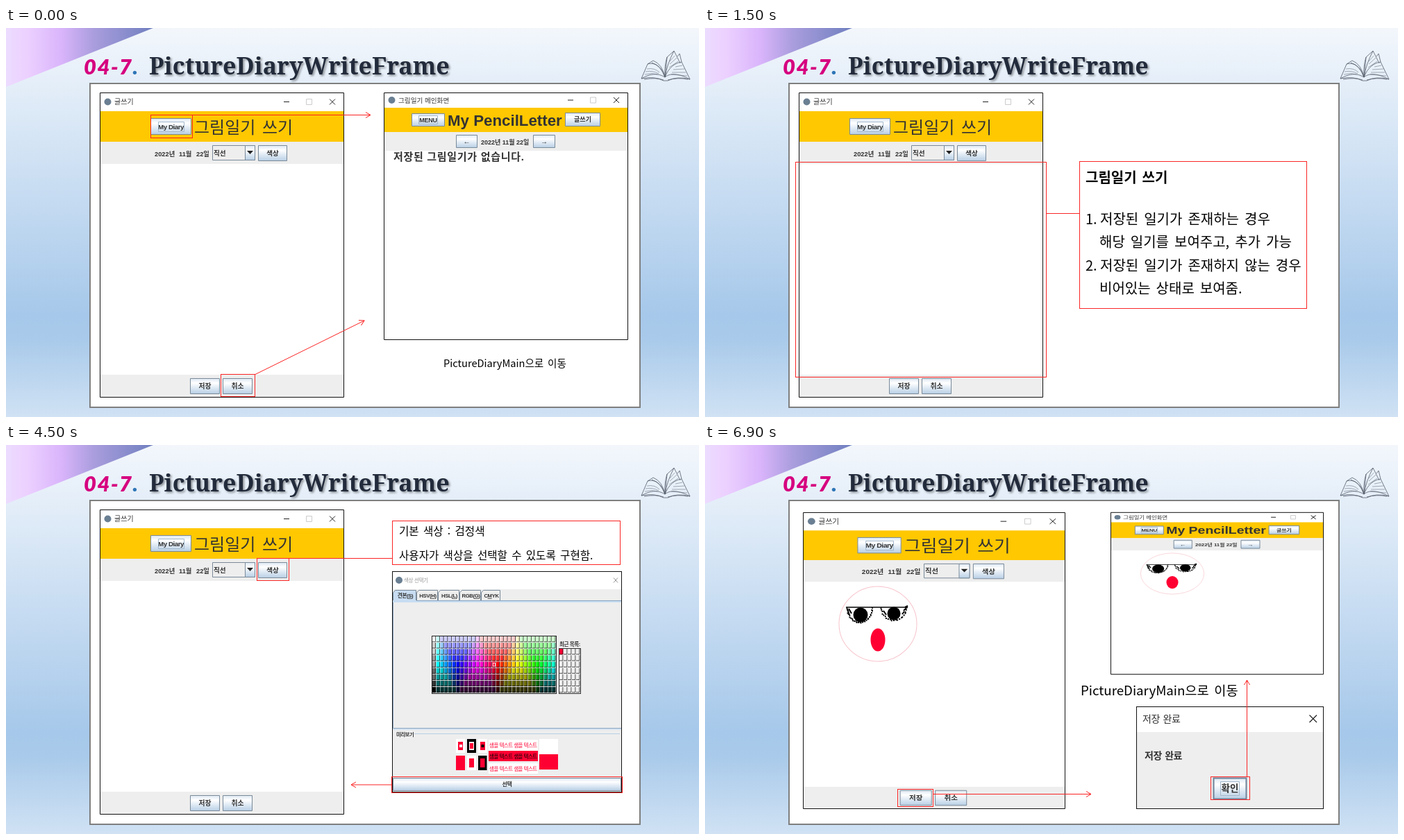
Recreate the animation shown at these times as an HTML page. Size 998 by 561 pixels, loop 7500 ms.

```html
<!DOCTYPE html>
<html lang="ko">
<head>
<meta charset="utf-8">
<title>Slides</title>
<style>
html, body { margin: 0; width: 100%; height: 100%; overflow: hidden; }
svg { display: block; width: 998px; height: 561px; }
text { white-space: pre; }
.ui { font-family: "Liberation Sans", "Noto Sans CJK KR", sans-serif; fill: #333; }
.slide { font-family: "Noto Sans CJK KR", sans-serif; word-spacing: .12em; fill: #000; }
.b { font-weight: 700; }
.mid { text-anchor: middle; }
.u { text-decoration: underline; }
.red { fill: none; stroke: #fb2424; stroke-width: 1; }
.edge { vector-effect: non-scaling-stroke; }
.title { font: 700 34.1px "Noto Serif", serif; fill: #222b3b; filter: drop-shadow(2px 2px 1.5px #0006); }
.num { font: italic 900 31px Lato, sans-serif; letter-spacing: 1.5px; fill: #d6007f; }
.scene { visibility: hidden; animation: show 7.5s step-end infinite; }
@keyframes show { 0% { visibility: visible; } 20%, 100% { visibility: hidden; } }
</style>
</head>
<body>
<svg id="stage" viewBox="0 0 998 561">
  <defs>
    <linearGradient id="sky" x2="0" y2="1">
      <stop offset="0" stop-color="#f3f7fc"/><stop offset=".74" stop-color="#a6c8ea"/>
      <stop offset=".8" stop-color="#a9caea"/><stop offset="1" stop-color="#d0e2f4"/>
    </linearGradient>
    <linearGradient id="corner">
      <stop offset="0" stop-color="#ecdcff"/><stop offset=".15" stop-color="#ecd0ff"/>
      <stop offset=".38" stop-color="#d9b4fb"/><stop offset=".6" stop-color="#a99ddd"/>
      <stop offset="1" stop-color="#7080c0"/>
    </linearGradient>
    <linearGradient id="metal" x2="0" y2="1">
      <stop offset="0" stop-color="#dde8f3"/><stop offset=".3" stop-color="#fff"/>
      <stop offset=".5" stop-color="#eaf1f8"/><stop offset="1" stop-color="#b8cfe5"/>
    </linearGradient>
  </defs>
  <rect width="998" height="561" fill="url(#sky)"/>
  <path d="M0 0H212L0 85Z" fill="url(#corner)"/>
  <text class="num" x="112" y="67">04-7<tspan fill="#2e75b6">.</tspan></text>
  <text class="title" x="206" y="67">PictureDiaryWriteFrame</text>
  <g fill="none" stroke="#555e6b" stroke-width=".8" stroke-linejoin="round">
    <path d="M949 71C938 64 927 66 915 73L924 52C934 49 944 55 949 71C957 64 970 66 985 74L973 49C964 50 954 57 949 71"/>
    <path d="M915 73Q934 69 947 76H953Q966 69 985 74M919 74Q936 71 947 75M953 75Q968 71 982 74"/>
    <path d="M924 52L932 47Q945 52 949 71L952 42L962 33L971 51M952 42Q948 54 949 71M962 33Q952 52 949 71M967 41L970 37L973 49M930 50Q943 54 949 71"/>
    <path d="M923 59Q934 57 941 64M921 63Q932 61 940 66M920 67Q930 64 938 67M964 56L974 54M961 60L977 59M959 64L979 64M958 67L981 69M956 48L963 40M956 52L966 43M955 57L968 48" stroke-width=".5"/>
  </g>
  <rect x="121" y="80" width="792" height="467" fill="#fff" stroke="#7f7f7f" stroke-width="2"/>
</svg>
<script>
const stage = document.getElementById('stage');

const rect = (x, y, x2, y2, fill, more = '') =>
  `<rect x="${x}" y="${y}" width="${x2 - x}" height="${y2 - y}" fill="${fill}" ${more}/>`;
const path = (d, more = '') => `<path d="${d}" fill="none" ${more}/>`;
const text = (cls, x, y, size, s, more = '') =>
  `<text class="${cls}" x="${x}" y="${y}" font-size="${size}" ${more}>${s}</text>`;
const bold = (x, y, size, s, more) => text('ui b', x, y, size, s, more);
const slide = (x, y, size, s, more) => text('slide', x, y, size, s, more);
const outline = 'class="edge" stroke="#7a8a99"';

const redBox = (x, y, x2, y2, fill = 'none') =>
  rect(x + .5, y + .5, x2 - .5, y2 - .5, fill, `class="red" style="fill:${fill}"`);
const redLine = d => path(d, 'class="red"');
const arrow = (x1, y1, x2, y2) => {
  const turn = Math.atan2(y2 - y1, x2 - x1) * 180 / Math.PI;
  return redLine(`M${x1} ${y1}L${x2} ${y2}`) +
    `<path class="red" d="M-7 -4L0 0L-7 4" transform="translate(${x2} ${y2}) rotate(${turn})"/>`;
};

const button = (x, y, x2, y2, label, size = 9.8, more = '') =>
  rect(x + .5, y + .5, x2 - .5, y2 - .5, 'url(#metal)', outline) +
  text('ui b mid', (x + x2) / 2, (y + y2) / 2 + size * .37, size, label, more);
const focus = (x, y, x2, y2) => rect(x + .5, y + .5, x2 - .5, y2 - .5, 'none', 'class="edge" stroke="#a3b8cc"');

// Title bar, banner and tool strip; the origin is the window's corner
const frame = (w, h, barH, bannerH, stripH, name, nameSize) => {
  const m = barH / 2, end = barH + bannerH;
  return rect(0, 0, w, h, '#fff') +
    `<circle cx="11.5" cy="${m}" r="5" fill="#6a7f92"/>` +
    text('ui', 21, m + nameSize * .38, nameSize, name) +
    path(`M${w - 87} ${m}h8M${w - 21} ${m - 4}l8 8m0 -8l-8 8`, 'class="edge" stroke="#222"') +
    rect(w - 54.5, m - 4, w - 46.5, m + 4, 'none', 'class="edge" stroke="#ccc"') +
    rect(0, barH, w, end, '#ffc800') + rect(0, end, w, end + stripH, '#eee');
};
const border = (w, h) => rect(.5, .5, w - .5, h - .5, 'none', 'class="edge" stroke="#111"');
const place = (x, y, body, sx = 1, sy = 1) => `<g transform="translate(${x} ${y}) scale(${sx} ${sy})">${body}</g>`;

const writer = (drawing = '') => frame(352, 440, 27, 44, 32, '글쓰기', 10) +
  button(73, 37, 132, 61, 'My Diary', 9.8, 'letter-spacing="-.5"') + focus(84, 42, 122, 57) +
  text('ui', 136, 59, 24, '그림일기 쓰기', 'word-spacing="3"') +
  bold(79, 91.5, 9.3, '2022년') + bold(114, 91.5, 9.3, '11월') + bold(139, 91.5, 9.3, '22일') +
  rect(162.5, 76.5, 223.5, 97.5, '#eee', outline) + bold(164, 90.5, 9.6, '직선') +
  rect(209.5, 76.5, 223.5, 97.5, 'url(#metal)', outline) + '<path d="M212 84h9l-4.500 5Z" fill="#222"/>' +
  button(228, 76, 270, 99, '색상', 9.5) + drawing + rect(0, 407, 352, 440, '#eee') +
  button(130, 412, 173, 435, '저장') + button(177, 412, 220, 435, '취소') + border(352, 440);

const viewer = body => frame(352, 357, 22, 35, 27, '그림일기 메인화면', 9.6) +
  button(40, 30, 88, 49, 'MENU', 9, 'letter-spacing="-.2"') + focus(50, 33, 78, 46) +
  bold(92, 48, 22.3, 'My PencilLetter') + button(261, 29, 312, 49, '글쓰기', 9) +
  button(104, 61, 135, 80, '←', 10) + bold(140, 74.5, 9, '2022년 11월 22일') +
  button(215, 61, 247, 80, '→', 10) + body + border(352, 357);

// Rough lower lid made of small dabs
const lid = (x, y, w, h, n) => {
  let d = '';
  for (let i = 0; i <= n; i++) {
    const a = Math.PI * i / n, wob = (i % 3 - 1) * .5;
    d += `M${(x - w * Math.cos(a) + wob).toFixed(1)} ${(y + h * Math.sin(a) - wob).toFixed(1)}h2`;
  }
  return path(d, 'stroke="#000" stroke-width="2"');
};
// Face in stage pixels of the large picture
const face = '<ellipse cx="249" cy="258" rx="56" ry="54" fill="none" stroke="#f7c4cc" stroke-width="1"/>' +
  path('M203 234H292', 'stroke="#000" stroke-width="1.300"') +
  '<ellipse cx="224" cy="245" rx="10.500" ry="10.500"/><ellipse cx="272" cy="243" rx="9.500" ry="9.500"/>' +
  lid(222, 235, 18, 21, 28) + lid(271, 235, 18, 18, 20) +
  path('M284 244l3 -4m-1 -1l4 -4m-2 -1l4 -2M205 237l3 8m-1 -9l4 7M257 239l4 6', 'stroke="#000" stroke-width="2"') +
  '<ellipse cx="249" cy="281" rx="10.500" ry="16.500" fill="#ff0033"/>';

const note = (x, first, second) => redBox(556, 109, 885, 173, '#fff') +
  slide(x, 129.5, 15.6, first) + slide(x, 164.5, 15.6, second);

const menu = () => {
  const items = ['직선', '곡선', '사각형', '사각형(색)', '원', '원(색)'];
  return rect(707.5, 262.5, 765.5, 340.5, '#eee', 'stroke="#444"') + rect(708, 289, 765, 301.5, '#a3b8cc') +
    items.map((s, i) => bold(709, 272.5 + i * 12.8, 8.8, s)).join('') + redBox(704, 260, 769, 344);
};

const cell = (x, y, w, h, fill) => rect(x, y, x + w - .7, y + h - .9, fill) +
  path(`M${x} ${y + h - 1.3}H${x + w - 1.1}V${y}`, 'stroke="#000" stroke-width=".7"');

const swatches = () => {
  const grays = [255, 204, 204, 153, 153, 102, 102, 51, 0];
  const w = 178 / 31, h = 82 / 9;
  let out = rect(613.5, 275.5, 792.5, 358.5, '#fff', 'stroke="#222"');
  for (let r = 0; r < 9; r++) for (let c = 0; c < 31; c++) {
    const low = Math.max(0, 204 - 51 * r), high = Math.min(255, 255 - 51 * (r - 4));
    const channel = peak => {
      const d = Math.abs(c - 1 - peak), near = Math.min(d, 30 - d);
      const full = 51 * Math.max(0, Math.min(5, 10 - near));
      return Math.max(low, Math.min(high, full));
    };
    const rgb = c ? [15, 25, 5].map(channel) : Array(3).fill(grays[r]);
    out += cell(614 + c * w, 276 + r * h, w, h, `rgb(${rgb})`);
  }
  return out + rect(701.5, 314.5, 704.5, 319, 'none', 'stroke="#fff" stroke-width=".8"');
};

const recent = () => {
  let out = rect(796.5, 293.5, 827.5, 358.5, '#fff', 'stroke="#333"');
  for (let i = 0; i < 35; i++)
    out += cell(797 + i % 5 * 6, 294 + Math.floor(i / 5) * 9.14, 6, 9.14, i ? '#eee' : '#ff0033');
  return out;
};

const tab = (x, x2, label, on) =>
  path(`M${x + .5} 224V213l3 -3.500H${x2 - .5}V224`, `stroke="#7a8a99" style="fill:${on ? '#c8ddf2' : '#eee'}"`) +
  text('ui b mid', (x + x2) / 2 + 1, 220, 7.7, label, 'letter-spacing="-.35"');
const key = s => `(<tspan class="u">${s}</tspan>)`;

const preview = () => {
  const hot = '#ff0033', sample = '샘플 텍스트 샘플 텍스트';
  const nest = (x, y, w, h, ...fills) => fills.map((f, i) =>
    rect(x + i * 3, y + i * 4, x + w - i * 3, y + h - i * 4, f)).join('');
  const line = (y, fill) => text('ui', 696, y, 7.5, sample, `style="fill:${fill}" letter-spacing="-.5"`);
  return nest(648, 424, 13, 20, '#fff', hot) + rect(653, 432, 657, 436, '#fff') +
    nest(664, 424, 13, 20, '#000', '#fff') + rect(668, 430, 673, 438, hot) +
    nest(680, 424, 13, 20, '#fff', hot) + rect(684.5, 432, 688.5, 436, '#000') +
    rect(648, 448, 661, 469, hot) + nest(664, 448, 13, 21, '#fff', hot) + nest(680, 448, 12.5, 21, '#000', hot) +
    rect(695, 425, 766, 441, '#fff') + rect(695, 441, 766, 456, hot) + rect(695, 459, 766, 474, '#fff') +
    line(436, hot) + line(452, '#000') + line(469.5, hot) +
    rect(768, 424, 795, 446, '#fff') + rect(768, 446, 795, 468, hot);
};

const chooser = () => rect(556.5, 182.5, 886.5, 500.5, '#eee', 'stroke="#111"') + rect(557, 183, 886, 208, '#fff') +
  '<circle cx="566" cy="195" r="5" fill="#6a7f92"/>' +
  text('ui', 573, 198, 7.6, '색상 선택기', 'style="fill:#999" letter-spacing="-.4"') +
  path('M875 191.500l6 7m0 -7l-6 7', 'stroke="#888" stroke-width=".9"') +
  tab(557, 591, '견본' + key('S'), true) + tab(591, 622, 'HSV' + key('H')) + tab(622, 653, 'HSL' + key('L')) +
  tab(653, 684, 'RGB' + key('G')) + tab(684, 712, 'C<tspan class="u">M</tspan>YK') +
  rect(557, 224, 886, 227, '#c8ddf2') + path('M591 224.500H886M557.500 227V408.500H886', 'stroke="#8ba5c0"') +
  swatches() + bold(797, 290, 7.6, '최근 목록:', 'letter-spacing="-.45"') + recent() +
  rect(557, 409, 886, 411, '#d5e3f1') +
  bold(562, 419.5, 7.4, '미리보기', 'letter-spacing="-.500"') + path('M588 416.500H884', 'stroke="#b8cfe5"') +
  preview() + button(557, 480, 886, 499, '선택', 8, 'letter-spacing="-.4"');

const alert = () => rect(621.5, 377.5, 890.5, 524.5, '#fff', 'stroke="#111"') + rect(622, 414, 890, 524, '#eee') +
  text('ui', 630, 400, 14, '저장 완료', 'letter-spacing="-.4" word-spacing="1"') +
  path('M870.500 389.500l10.500 10.500m0 -10.500l-10.500 10.500', 'stroke="#222" stroke-width="1.200"') +
  bold(633, 453, 14, '저장 완료', 'letter-spacing="-.5" word-spacing="1"') +
  button(732, 480, 780, 511, '확인', 13.5) + rect(732.5, 480.5, 779.5, 510.5, 'none', 'stroke="#6d8299" stroke-width="2"') +
  focus(742, 485, 770, 506);

const base = place(135, 93, writer());
// Maps the face into each window's own coordinates
const wide = [378 / 352, 428 / 440], small = [307 / 352, 234 / 357];
const inWriter = `<g transform="scale(${1 / wide[0]} ${1 / wide[1]}) translate(-141 -97)">${face}</g>`;
const inViewer = `<g transform="scale(${1 / small[0]} ${1 / small[1]}) translate(-584 -97) translate(673 185.500) scale(.815 .548) translate(-249 -258)">${face}</g>`;

const scenes = [
  base +
    place(544, 93, viewer(bold(14, 97.5, 15, '저장된 그림일기가 없습니다.', 'letter-spacing=".7"'))) +
    redBox(208, 125, 269, 159) + arrow(268, 125.5, 525, 125.5) +
    redBox(309, 499, 359, 532) + arrow(358, 500, 516, 422) +
    slide(630, 488.5, 14.6, 'PictureDiaryMain으로 이동'),

  base + redBox(130, 193, 492, 504) + redLine('M491 267.500H539') + redBox(539, 192, 867, 405, '#fff') +
    text('slide b', 548, 223, 20, '그림일기 쓰기') +
    slide(548, 282.5, 20, '1.') + slide(569, 282.5, 20, '저장된 일기가 존재하는 경우') +
    slide(568, 316, 20, '해당 일기를 보여주고, 추가 가능') +
    slide(548, 349.5, 20, '2.') + slide(569, 349.5, 20, '저장된 일기가 존재하지 않는 경우') +
    slide(568, 383, 20, '비어있는 상태로 보여줌.'),

  base + redBox(293, 163, 362, 196) + redLine('M361 163.500H556') +
    note(564, '기본 설정 : 직선', '총 6가지의 옵션에 따라 그려지는 상태가 달라짐') +
    place(555, 185, writer(), 330 / 352, 348 / 440) + menu(),

  base + redBox(361, 163, 408, 196) + redLine('M407 163.500H556') +
    note(566, '기본 색상 : 검정색', '사용자가 색상을 선택할 수 있도록 구현함.') +
    chooser() + redBox(555, 478, 888, 502) + arrow(555, 490, 497, 490),

  place(141, 97, writer(inWriter), ...wide) + place(584, 97, viewer(inViewer), ...small) + alert() +
    slide(541, 361, 18.7, 'PictureDiaryMain으로 이동') +
    redBox(277, 496, 329, 522) + arrow(329, 503.5, 556, 503.5) +
    redBox(728, 478, 785, 512) + arrow(780.5, 478, 780.5, 339)
];

stage.insertAdjacentHTML('beforeend', scenes.map((body, i) =>
  `<g class="scene" style="animation-delay:${i * 1.5 - 7.5}s">${body}</g>`).join(''));
</script>
</body>
</html>
```
